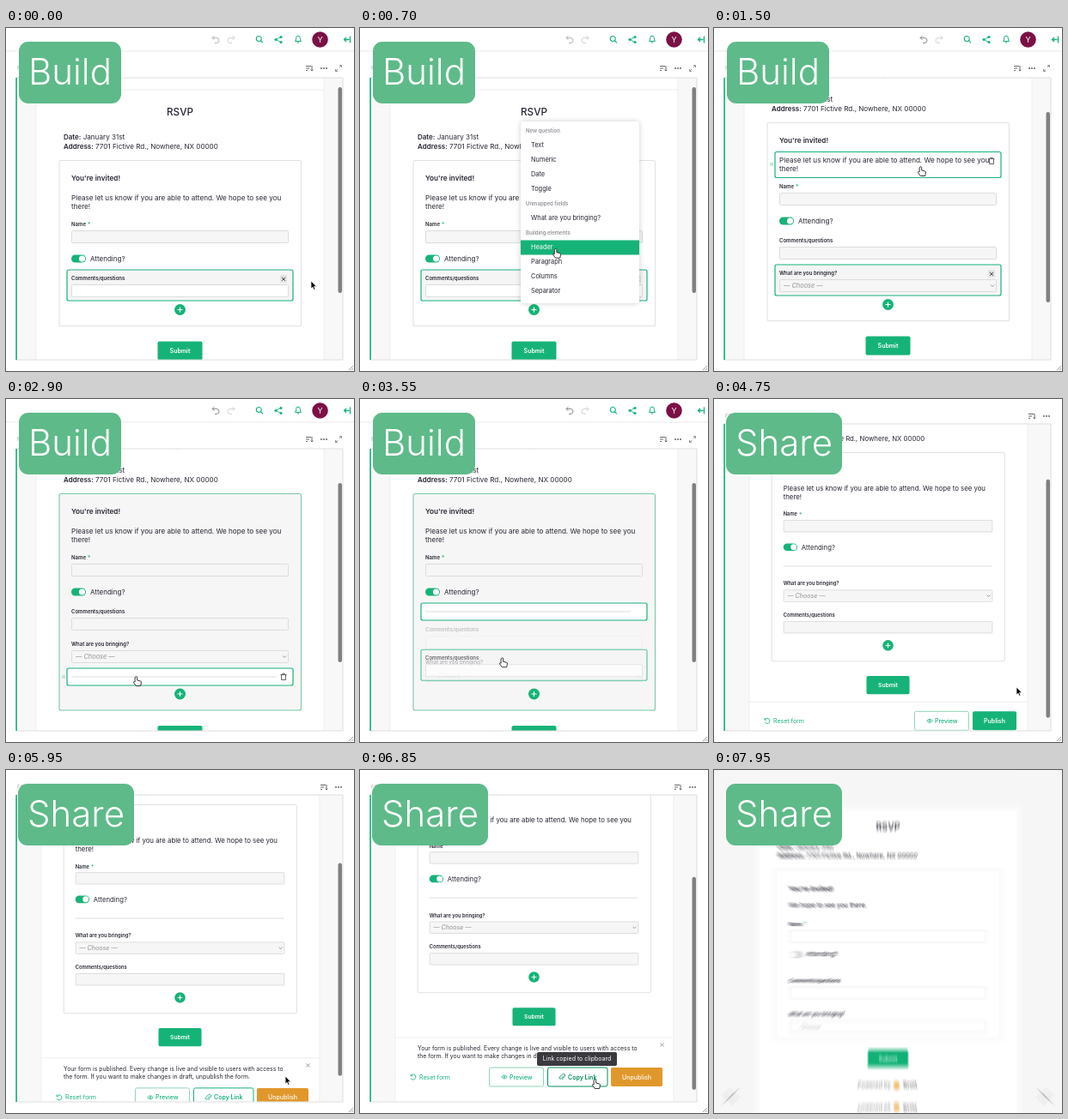
An HTML page with a canvas for the animation above (8 s loop, 405x400 px).

```html
<!DOCTYPE html>
<html lang="en">
<head>
<meta charset="utf-8">
<title>Form builder</title>
<style>
html, body { margin: 0; width: 100%; height: 100%; overflow: hidden; background: #fff; }
canvas { display: block; width: 405px; height: 400px; }
</style>
</head>
<body>
<canvas id="stage"></canvas>
<script>
const W = 405, H = 400, LOOP = 8000;
const GREEN = '#16b378', INK = '#262633', LINE = '#dcdcdc', PALE = '#f8f8f8';
const ADDRESS = '7701 Fictive Rd., Nowhere, NX 00000';
const dpr = window.devicePixelRatio || 1;
const canvas = document.getElementById('stage');
const buffer = document.createElement('canvas');
for (const c of [canvas, buffer]) { c.width = W * dpr; c.height = H * dpr; }
const front = canvas.getContext('2d'), back = buffer.getContext('2d');
let g = front;

const part = (t, a, b) => Math.min(1, Math.max(0, (t - a) / (b - a)));
const smooth = p => p * p * (3 - 2 * p);
const easeOut = p => 1 - (1 - p) ** 2;
const within = (t, a, b) => t >= a && t < b;

function track(t, keys) {
  let i = 0;
  while (i < keys.length - 2 && t >= keys[i + 1][0]) i++;
  const [ta, xa, ya] = keys[i], [tb, xb, yb] = keys[i + 1];
  const p = smooth(part(t, ta, tb));
  return [xa + (xb - xa) * p, ya + (yb - ya) * p];
}

// ---- drawing helpers ----
function text(s, x, y, size, color = INK, style = '400', align = 'left') {
  g.font = `${style} ${size}px Inter, sans-serif`;
  g.textAlign = align;
  g.textBaseline = 'middle';
  g.fillStyle = color;
  g.fillText(s, x, y);
  return x + g.measureText(s).width;
}
function box(x, y, w, h, r, fill, stroke, lw = 1) {
  g.beginPath();
  g.roundRect(x, y, w, h, r);
  if (fill) { g.fillStyle = fill; g.fill(); }
  if (stroke) { g.strokeStyle = stroke; g.lineWidth = lw; g.stroke(); }
}
function path(d, x, y, stroke, lw = 1, fill) {
  g.save();
  g.translate(x, y);
  const p = new Path2D(d);
  if (fill) { g.fillStyle = fill; g.fill(p); }
  if (stroke) { g.strokeStyle = stroke; g.lineWidth = lw; g.lineJoin = 'round'; g.stroke(p); }
  g.restore();
}
function circle(x, y, r, fill) {
  g.beginPath();
  g.arc(x, y, r, 0, 7);
  g.fillStyle = fill;
  g.fill();
}
const rule = (x1, y1, x2, y2, color, lw) => path(`M0 0L${x2 - x1} ${y2 - y1}`, x1, y1, color, lw);
const cross = (x, y, r, color) => path(`M${-r} ${-r}L${r} ${r}M${r} ${-r}L${-r} ${r}`, x, y, color, 0.9);
const trash = (x, y) => path('M-3.5-2.5h7M-1.2-2.5v-1.3h2.4v1.3M-2.5-2.5v6h5v-6', x, y, '#555', 0.9);
const grip = y => path('M-1-2v4M1-2v4', 67, y, '#8fd5b5', 1);

function pointer(x, y, hand) {
  if (hand) path('M0 0q1.3-1 1.7.5V4l4 1q1 .5.7 2l-.8 3.5H.3L-2.6 6.5q0-1.3 1.3-.8L-.9 6V.8z',
    x, y, '#222', 0.9, '#fff');
  else path('M0 0v9l2-1.8L3.4 10.3l1.5-.7L3.5 6.6h2.8z', x, y, '#fff', 0.7, '#000');
}
function toggle(y, on) {
  box(76, y - 4.5, 17, 9, 4.5, on ? GREEN : '#ddd');
  circle(on ? 88.5 : 80.5, y, 3.6, '#fff');
}
function button(label, x, y, w, fill, ink, stroke, style = '600') {
  box(x, y - 11, w, 22, 2, fill, stroke);
  if (label) text(label, x + w / 2, y + 0.5, 7, ink, style, 'center');
}
function caption(s, x, w) {
  box(x, 16, w, 72, 11, '#5eba89');
  text(s, x + w / 2, 53, 42, '#fff', '300', 'center');
}

// ---- form under construction ----
const pitch = kind => kind === 'rule' ? 21.5 : 38;

function item(kind, y, active) {
  const h = kind === 'rule' ? 20 : 36;
  if (active) box(71, y, 263, h, 2, kind === 'rule' ? '#fff' : '#f5f5f5', GREEN, 1.2);
  if (kind === 'rule') return rule(76, y + 10, active ? 315 : 328, y + 10, '#ddd', 1);
  const choice = kind === 'choice';
  text(choice ? 'What are you bringing?' : 'Comments/questions', 76, y + 10, 6, INK, '600');
  box(76.5, y + 17.5, 252, 14, 1, active && !choice ? '#fff' : '#f6f6f6', LINE);
  if (choice) {
    text('— Choose —', 81, y + 25, 7.4, '#929299', 'italic 400');
    path('M-2-1L0 1 2-1', 324, y + 24.5, '#888', 0.9);
  }
}

function form({ order, active, hoverCard, hoverText, trashRule, drag }) {
  const end = order.reduce((y, k) => y + pitch(k), 282), plus = end + 8.5;
  rule(35, 72, 370, 72, '#ececec', 1);
  text('RSVP', 202.5, 98, 11.7, INK, '500', 'center');
  text(' January 31st', text('Date:', 67, 128, 8, INK, '600'), 128, 8.1);
  text(' ' + ADDRESS, text('Address:', 67, 138.5, 8, INK, '600'), 138.5, 8.1);
  box(62, 154.5, 281.5, plus - 135.5, 2, hoverCard ? '#f6f6f6' : null, hoverCard ? '#79c9a5' : '#e2e2e2', 1.1);
  text("You're invited!", 76, 176, 8.2, INK, '600');
  if (hoverText) box(71, 188.5, 263, 30, 2, '#fff', GREEN, 1.2);
  text('Please let us know if you are able to attend. We hope to see you', 76, 198.5, 8.1);
  text('there!', 76, 209, 8.1);
  if (hoverText) { trash(323, 199); grip(203); }
  text(' *', text('Name', 76, 229.5, 6, INK, '600'), 229.5, 7, GREEN);
  box(76.5, 236.5, 252, 14, 1, '#f6f6f6', LINE);
  toggle(269, true);
  text('Attending?', 98, 269.5, 8);
  let y = 282;
  for (const k of order) {
    g.globalAlpha = drag && drag[0] === k ? 0.25 : 1;
    item(k, y, k === active);
    if (k === active && k !== 'rule') {
      box(319, y + 6, 8, 9, 1, '#e4e4e4');
      cross(323, y + 10.8, 2, INK);
    }
    if (k === 'rule' && trashRule) { trash(323, y + 10); grip(y + 10); }
    y += pitch(k);
  }
  if (drag) { g.globalAlpha = 0.7; item(drag[0], drag[1], true); }
  g.globalAlpha = 1;
  circle(202.5, plus, 6.5, GREEN);
  path('M-3 0h6M0-3v6', 202.5, plus, '#fff', 1);
  button('Submit', 176.5, plus + 48, 52, GREEN, '#fff');
}

// ---- chrome ----
function tools(x, y) {
  path('M-4-2.5h6M-4 0h4M-4 2.5h2M3-3v6M1.7 1.7L3 3l1.3-1.3', x, y, '#555', 0.9);
  for (const d of [-3, 0, 3]) circle(x + 17 + d, y, 0.9, '#555');
}
function header(edited) {
  const undo = 'M-1.5-4.5L-4-2l2.5 2.5M-4-2H1a3 3 0 0 1 0 6h-2';
  path(undo, 244, 13.5, edited ? '#8b8b94' : '#b4b4bb', 1);
  g.save(); g.translate(262, 0); g.scale(-1, 1);
  path(undo, 0, 13.5, '#d2d2d6', 1);
  g.restore();
  path('M2.3-.5a3 3 0 1 1-6 0a3 3 0 1 1 6 0M1.5 1.7L4 4.3', 295, 13, GREEN, 1.1);
  path('M2.5-3L-2.5 0 2.5 3', 317, 13.5, GREEN, 0.9);
  for (const [x, y] of [[320, 10.5], [314, 13.5], [320, 16.5]]) circle(x, y, 1.6, GREEN);
  path('M-3.5 2.5q1.2-1 1.2-4a2.3 2.3 0 0 1 4.6 0q0 3 1.2 4zM-1 4h2', 340, 13, GREEN, 1);
  circle(365.5, 13.5, 9.3, '#7b1045');
  text('Y', 365.5, 14, 9, '#fff', '400', 'center');
  path('M0 0h6M2.5-2.5L0 0l2.5 2.5M7-4v8', 393.5, 13.5, GREEN, 1.3);
  rule(0, 27, W, 27, '#e9e9e9', 1);
}
function pane(y, left, right, draw, bar, len) {
  g.save();
  g.beginPath(); g.rect(12, y, 380, 387 - y); g.clip();
  box(12, y, 380, 387 - y, 0, PALE);
  box(left, y, right - left, 387 - y, 0, '#fff');
  rule(left, y, left, 387, '#eeeeee', 1);
  rule(right, y, right, 387, '#eeeeee', 1);
  draw();
  g.restore();
  box(12, y, 380, 387 - y, 0, null, '#dedede');
  box(11.3, y, 1.6, 387 - y, 0, GREEN);
  box(386.5, bar, 4.5, len, 2.2, '#808080');
  path('M0 5L5 0M3 5L5 3', 399, 394, '#999', 0.9);
}

const MENU = ['New question', 'Text', 'Numeric', 'Date', 'Toggle', 'Unmapped fields',
  'What are you bringing?', 'Building elements', 'Header', 'Paragraph', 'Columns', 'Separator'];
function menu(y) {
  g.save();
  g.shadowColor = '#0003'; g.shadowBlur = 6;
  box(187, 109, 138, 212, 3, '#fff');
  g.restore();
  MENU.forEach((s, i) => {
    const head = i === 0 || i === 5 || i === 7, cy = 120 + i * 17;
    const on = !head && Math.abs(y + 1 - cy) < 8.5;
    if (on) box(187, cy - 8.5, 138, 17, 0, GREEN);
    text(s, head ? 193 : 199, cy, head ? 6 : 7.4, on ? '#fff' : head ? '#929299' : INK, head ? '600' : '400');
  });
}

// ---- scenes ----
function build(t) {
  const scroll = 44 * smooth(part(t, 900, 1150));
  const [x, y] = track(t, [[100, 355, 295], [400, 203, 327], [550, 203, 327], [800, 240, 221],
    [950, 240, 221], [1250, 262, 210], [1500, 240, 162], [1750, 240, 166], [2050, 203, 321],
    [2200, 203, 321], [2400, 225, 305], [2600, 225, 305], [2850, 151, 324], [2920, 151, 324],
    [3170, 165, 238], [3270, 165, 238], [3370, 165, 270], [3580, 165, 304]]);
  const order = t < 850 ? ['note'] : t < 2600 ? ['note', 'choice'] : t < 3200 ? ['note', 'choice', 'rule']
    : t < 3600 ? ['rule', 'note', 'choice'] : ['rule', 'choice', 'note'];
  const drag = within(t, 2920, 3200) ? ['rule', y + scroll - 10]
    : within(t, 3370, 3600) ? ['note', y + scroll - 10] : null;
  const open = within(t, 450, 850) || within(t, 2100, 2600);
  const hoverText = !open && within(t, 1150, 2100) && y > 143 && y < 175;
  header(t >= 850);
  text('F', 13, 47, 6, '#aaa');
  tools(353, 47);
  path('M1-1L3.5-3.5M1-3.5h2.5v2.5M-1 1L-3.5 3.5M-3.5 1v2.5h2.5', 387, 47, '#888', 0.9);
  pane(58, 35, 370, () => {
    g.translate(0, -scroll);
    form({
      order, drag, hoverText,
      active: t < 850 ? 'note' : t < 2600 ? 'choice' : t < 3600 ? 'rule' : null,
      hoverCard: within(t, 2650, 3600), trashRule: within(t, 2600, 3200)
    });
  }, 69 + scroll * 0.66, t < 850 ? 240 : t < 2600 ? 222 : 209);
  if (open) menu(y);
  pointer(x, y, t > 350 && t < 3700);
}

function footer(live, linkHover) {
  const y = live ? 477.5 : 449;
  rule(41, y - (live ? 46 : 22), 365, y - (live ? 46 : 22), '#eeeeee', 1);
  if (live) {
    text('Your form is published. Every change is live and visible to users with access to', 67, 444.5, 6.9);
    text('the form. If you want to make changes in draft, unpublish the form.', 67, 453.5, 6.9);
    cross(351.5, 440, 2, '#888');
  }
  path('M-2.6-1.6a3 3 0 1 1-.2 3M-3-3.2v2h2', 62, y, GREEN, 0.9);
  text('Reset form', 69, y + 0.5, 7, GREEN);
  const px = live ? 150.5 : 233.5;
  button('', px, y, 63, '#fff', GREEN, '#8fd5b5');
  path('M-3.3 0Q0-4 3.3 0Q0 4-3.3 0zM-.9 0a.9.9 0 1 0 1.8 0a.9.9 0 1 0-1.8 0', px + 17.5, y, GREEN, 0.8);
  text('Preview', px + 23.5, y + 0.5, 7, GREEN, '500');
  if (!live) return button('Publish', 301, y, 51, GREEN, '#fff');
  const green = linkHover ? '#009058' : GREEN;
  button('', 218.5, y, 69.5, '#fff', green, green);
  path('M2-1.5L-1 1.8a1.2 1.2 0 0 1-1.8-1.6L.5-3a1.7 1.7 0 0 1 2.6 2.3L0 3', 235, y, green, 0.9);
  text('Copy Link', 242, y + 0.5, 7, green, '600');
  button('Unpublish', 292, y, 60, '#e0982c', '#fff', null, '500');
}

function share(t) {
  const live = t >= 5650;
  const scroll = 91 * easeOut(part(t, 4300, 5100)) + 28.5 * smooth(part(t, 5900, 6100));
  const [x, y] = track(t, [[5150, 352, 336], [5450, 326, 357], [5900, 326, 357], [6550, 273, 361]]);
  text('FORM', 13, 20, 6, '#aaa');
  tools(370, 20);
  pane(29, 41, 365, () => {
    g.translate(0, -scroll);
    g.save();
    g.translate(202.5, -12.6);
    g.scale(0.963, 0.963);
    g.translate(-202.5, 0);
    form({ order: ['rule', 'choice', 'note'] });
    g.restore();
    footer(live, t >= 6450);
  }, 43.6 + scroll * 0.68, live ? 248 : 278);
  if (t >= 6750) {
    box(206, 329, 93, 16, 2, '#3a3a3f');
    text('Link copied to clipboard', 252.5, 337.3, 7, '#fff', '400', 'center');
  }
  pointer(x, y, within(t, 5400, 5950) || t > 6400);
}

function published() {
  box(0, 0, W, H, 0, '#f7f7f7');
  box(33, 27.5, 339, 373, 0, '#fff');
  text('RSVP', 202.5, 52, 11.7, INK, '500', 'center');
  text(' January 31st', text('Date:', 60.5, 78.5, 8, INK, '600'), 78.5, 8.1);
  text(' ' + ADDRESS, text('Address:', 60.5, 89.5, 8, INK, '600'), 89.5, 8.1);
  box(55, 106, 295, 221, 2, null, '#f0f0f0');
  text("You're invited!", 75, 132.5, 8.2, INK, '600');
  text('We hope to see you there.', 75, 154, 8.1);
  text(' *', text('Name', 75, 178, 6, INK, '600'), 178, 7, GREEN);
  toggle(217, false);
  text('Attending?', 97, 217, 8);
  text('Comments/questions', 75, 251, 6.4, INK, '600');
  text('What are you bringing?', 75, 294, 6.4, INK, '600');
  for (const y of [186, 259, 303]) box(75.5, y, 254, 15, 1, '#fff', '#eeeeee');
  text('Choose', 90, 311, 7, '#b5b5b5');
  button('Submit', 176.5, 351, 52, GREEN, '#fff');
  text('Powered by', 163.5, 386, 7.6, '#666');
  circle(213.5, 386, 4, '#f0a94a');
  text('Brolt', 222, 386, 8, '#444', '500');
  path('M0 0L7-7', 0, 400, '#aaa', 1.5);
  path('M0 0L-7-7', W, 400, '#aaa', 1.5);
}

// ---- transitions: mirrored tiles with motion blur ----
const HALF = 341, SLIDE = 3950, ZOOM = 7740;

function tile(i, j) {
  g.save();
  g.translate((i + 0.5) * W, (j + 0.5) * H);
  g.scale(i % 2 ? -1 : 1, j % 2 ? -1 : 1);
  g.drawImage(buffer, -W / 2, -H / 2, W, H);
  g.restore();
}
function slide(t) {
  const d = t < SLIDE ? -2 * W * part(t, SLIDE - HALF, SLIDE) ** 2
    : 2 * W * (1 - part(t, SLIDE, SLIDE + HALF)) ** 2;
  const k = Math.floor(-d / W);
  g.translate(d, 0);
  tile(k, 0);
  tile(k + 1, 0);
}
function zoom(t) {
  const s = t < ZOOM ? 1 + 2 * part(t, ZOOM - HALF, ZOOM) ** 2
    : 1 - 2 / 3 * (1 - part(t, ZOOM, ZOOM + HALF)) ** 2;
  g.translate(W / 2, H / 2);
  g.scale(s, s);
  g.translate(-W / 2, -H / 2);
  for (let i = -1; i < 2; i++) for (let j = -1; j < 2; j++) tile(i, j);
}
function blurred(move, t, swap, shutter) {
  const n = 8;
  for (let i = 0; i < n; i++) {
    const u = t + (i / (n - 1) - 0.5) * shutter;
    g.save();
    g.globalAlpha = 1 / (i + 1);
    move(t < swap ? Math.min(u, swap - 0.01) : Math.max(u, swap));
    g.restore();
  }
}

function page(t) {
  g.setTransform(dpr, 0, 0, dpr, 0, 0);
  g.fillStyle = '#fff';
  g.fillRect(0, 0, W, H);
  if (t < SLIDE) build(t);
  else if (t < ZOOM) share(t);
  else published();
}
function title(t) {
  if (t < SLIDE) caption('Build', 15, 119);
  else caption('Share', 14, 135);
}
function render(t) {
  const sliding = Math.abs(t - SLIDE) < HALF, zooming = Math.abs(t - ZOOM) < HALF;
  g = sliding || zooming ? back : front;
  page(t);
  if (!zooming) title(t);
  if (g === front) return;
  g = front;
  g.setTransform(dpr, 0, 0, dpr, 0, 0);
  if (sliding) return blurred(slide, t, SLIDE, 5.5);
  blurred(zoom, t, ZOOM, 30);
  title(t);
}

const start = performance.now();
function frame() {
  render((performance.now() - start) % LOOP);
  requestAnimationFrame(frame);
}
frame();
</script>
</body>
</html>
```
